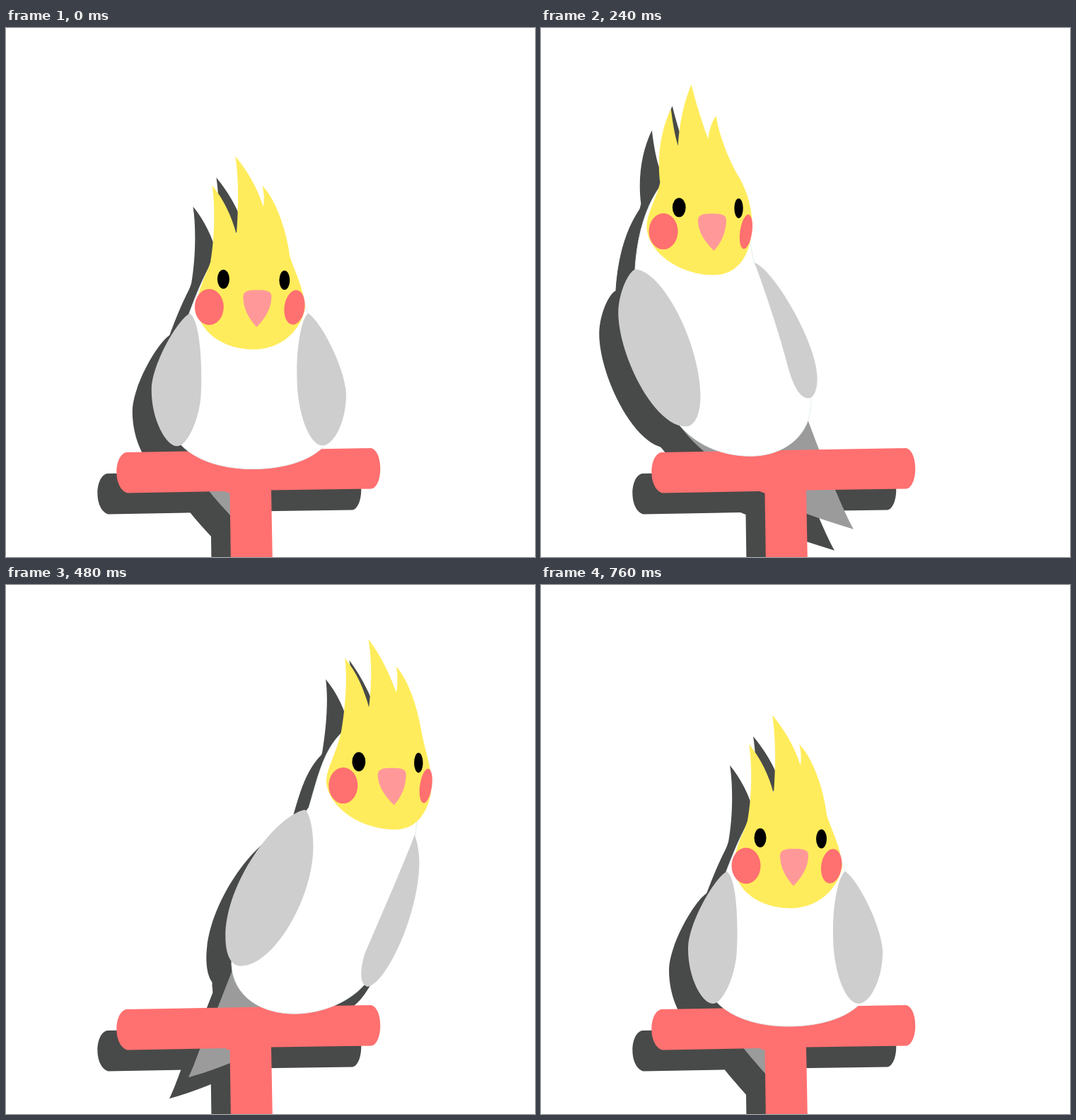
An HTML page for the animation above (0.8 s loop, 748 by 748 pixels).

```html
<!DOCTYPE html>
<html lang="en">
<head>
<meta charset="utf-8">
<title>Hopping cockatiel</title>
<style>
  html, body { margin: 0; width: 100%; height: 100%; overflow: hidden; background: #fff; }
  svg { display: block; width: 100vw; height: 100vh; }
  #scene { filter: drop-shadow(-26.5px 30.5px 0 #484a49); }
</style>
</head>
<body>
<svg viewBox="0 0 748 748"><g id="scene"></g></svg>
<script>
const LOOP = 800, STEP = 40, LEG = 200, FIRST_PEAK = 160, REACH = 1.022;
const RED = '#ff7070', GREY = '#cecece';

const ellipse = (cx, cy, rx, ry, tilt = 0) => {
  const a = tilt * Math.PI / 180;
  const dx = rx * Math.cos(a), dy = rx * Math.sin(a);
  const n = v => v.toFixed(2);
  const half = s => `a${rx} ${ry} ${tilt} 1 1 ${n(s * dx)} ${n(s * dy)}`;
  return `M${n(cx - dx)} ${n(cy - dy)}${half(2)}${half(-2)}Z`;
};

// x, y: middle of the upper edge; lean: sideways shift of the point
const beak = (x, y, lean) =>
  `M${x - 20} ${y + 9}C${x - 19} ${y} ${x - 9} ${y} ${x} ${y}C${x + 9} ${y} ${x + 20} ${y} ${x + 20} ${y + 9}` +
  `C${x + 20} ${y + 30} ${x + 6 + lean} ${y + 45} ${x - 1 + lean} ${y + 52.5}` +
  `C${x - 8 + lean} ${y + 45} ${x - 20} ${y + 30} ${x - 20} ${y + 9}Z`;

// Poses: left, middle, right and, where it differs, middle on the way back
const parts = [
  { fill: '#9b9b9b', poses: [
    'M188 560C210 590 260 625 330 656C345 678 400 694 456 709C436 680 400 600 373 538Z',
    'M275 590C278 625 278 644 288 657C300 672 315 688 330 706C352 700 365 650 380 600Z',
    'M329 530C300 600 285 635 272 657C265 670 257 685 249 695C310 678 390 650 440 598Z'] },
  { fill: RED, poses: [
    'M170 600L516 594C534 598 533 648 517 651.5L375 653.5L377 760L318 760L316.5 658L309 655L172 657.5C151 652 152 604 170 600Z'] },
  { fill: '#fff', line: '#e3eff2', poses: [
    'M205 170C149 192 120 252 117 332C117 420 132 500 182 551C208 583 245 603 290 603C335 603 372 573 371 525C371 480 340 400 285 322C278 280 265 190 205 170Z',
    'M348 280C305 300 283 350 262 405C235 460 225 500 230 550C235 600 290 624 350 624C410 624 468 602 469 550C470 500 455 440 430 405C415 360 395 300 348 280Z',
    'M545 170C473 190 467 240 449 303C400 370 330 470 330 535C332 580 370 604 415 604C450 604 492 588 517 560C560 500 590 430 597 348C610 290 600 185 545 170Z'] },
  { fill: GREY, poses: [
    'M118 333C109 334 97 362 97 388C97 450 151 560 200 560C213 560 220 543 219 518C216 440 160 337 118 333Z',
    'M263 405C246 413 208 478 208 515C208 556 228 592 243 592C258 592 276 550 277 515C279 470 276 415 263 405Z',
    'M442 307C396 317 323 415 323 495C323 520 330 532 343 532C393 532 454 430 454 352C454 330 448 309 442 307Z'] },
  { fill: GREY, poses: [
    'M286 323C298 350 325 420 338 465C347 495 356 515 369 515C377 515 380 503 379 488C376 435 312 330 286 323Z',
    'M430 405C420 412 412 455 413 495C413 545 430 591 449 592C466 592 484 555 483 517C482 485 450 418 430 405Z',
    'M596 347C585 380 548 463 520 522C510 545 509 562 519 565C545 562 597 455 597 375C597 362 597 353 596 347Z'] },
  { fill: '#ffec5c', poses: [
    'M169 101C155 128 148 165 153 205C148 228 134 248 134 267C136 305 185 336 230 336C262 336 282 312 283 262C282 235 275 215 267 201C250 175 236 140 232 111C226 118 222 130 220 144C210 115 202 88 197 67C189 85 180 115 178 153C173 135 171 118 169 101Z',
    'M303 225C292 258 288 300 292 328C287 350 273 372 273 398C276 435 312 457 353 457C392 457 420 430 426 398C424 370 410 345 402 322C394 295 380 255 374 230C369 240 367 250 367 260C357 240 345 210 339 186C330 205 324 240 321 277C312 260 307 245 303 225Z',
    'M501 88C507 120 503 160 497 190C490 225 475 245 475 265C480 300 525 332 575 332C605 332 624 305 624 262C623 245 617 225 612 201C606 160 594 122 574 101C577 113 577 126 575 139C565 110 552 85 534 63C541 95 541 130 537 160C530 132 519 108 501 88Z',
    'M294 225C299 255 298 300 292 333C287 350 273 372 273 398C276 435 312 457 353 457C392 457 420 430 426 398C424 370 410 345 404 325C400 290 385 245 365 225C368 235 368 245 367 255C357 225 343 203 327 184C332 215 332 255 329 295C322 268 310 244 294 225Z'] },
  { fill: RED, poses: [
    ellipse(158.5, 274, 20.5, 25.5), ellipse(290, 397, 20.5, 25.5), ellipse(500, 269.5, 20.5, 25.5)] },
  { fill: RED, poses: [
    ellipse(275, 274.5, 7.5, 24.5, 8), ellipse(410, 397.5, 16.5, 24.5, 10),
    ellipse(616.5, 270, 7.5, 24.5, 8), ellipse(410.7, 397.5, 14.5, 24.5, 8)] },
  { fill: '#ff9999', poses: [beak(227.5, 248.8, 4), beak(358, 373, 0), beak(569, 244.5, 4.5)] },
  { poses: [
    ellipse(181, 241, 9.5, 13.5), ellipse(310, 357.5, 8.5, 13.5), ellipse(522.3, 236.5, 9.5, 13.5)] },
  { poses: [
    ellipse(265, 242, 6, 13.5), ellipse(396.5, 359, 7.5, 13.5), ellipse(606.5, 238, 6, 13.5)] }
];

const scene = document.getElementById('scene');
const NUM = /-?[\d.]+/g;
for (const part of parts) {
  const { fill = '#000', line = 'none', poses } = part;
  part.el = document.createElementNS('http://www.w3.org/2000/svg', 'path');
  part.el.setAttribute('fill', fill);
  part.el.setAttribute('stroke', line);
  part.el.setAttribute('d', poses[0]);
  part.values = poses.map(p => p.match(NUM).map(Number));
  if (poses.length === 3) part.values.push(part.values[1]);
  scene.append(part.el);
}

// Same curve as cubic-bezier(.94, 0, .06, 1)
function ease(x) {
  let lo = 0, hi = 1, s = 0.5;
  for (let i = 0; i < 30; i++) {
    const r = 1 - s;
    if (2.82 * s * r * r + 0.18 * s * s * r + s * s * s < x) lo = s; else hi = s;
    s = (lo + hi) / 2;
  }
  return s * s * (3 - 2 * s);
}

function draw(time) {
  const t = Math.floor(time / STEP) * STEP;
  const u = ((t + LOOP - FIRST_PEAK) % LOOP) / LEG;
  const leg = Math.floor(u), e = ease(u - leg), next = (leg + 1) % 4;
  const leaving = leg % 2 === 0;
  const side = leaving ? leg : next, mid = leaving ? next : leg;
  const w = REACH * (leaving ? 1 - e : e);
  for (const { el, poses, values } of parts) {
    if (poses.length === 1) continue;
    const a = values[mid], b = values[side];
    let i = 0;
    el.setAttribute('d', poses[0].replace(NUM, () => {
      const v = a[i] + (b[i] - a[i]) * w;
      i++;
      return v.toFixed(2).replace(/\.00$/, '');
    }));
  }
}

function tick() {
  draw(performance.now());
  requestAnimationFrame(tick);
}
tick();
</script>
</body>
</html>
```
